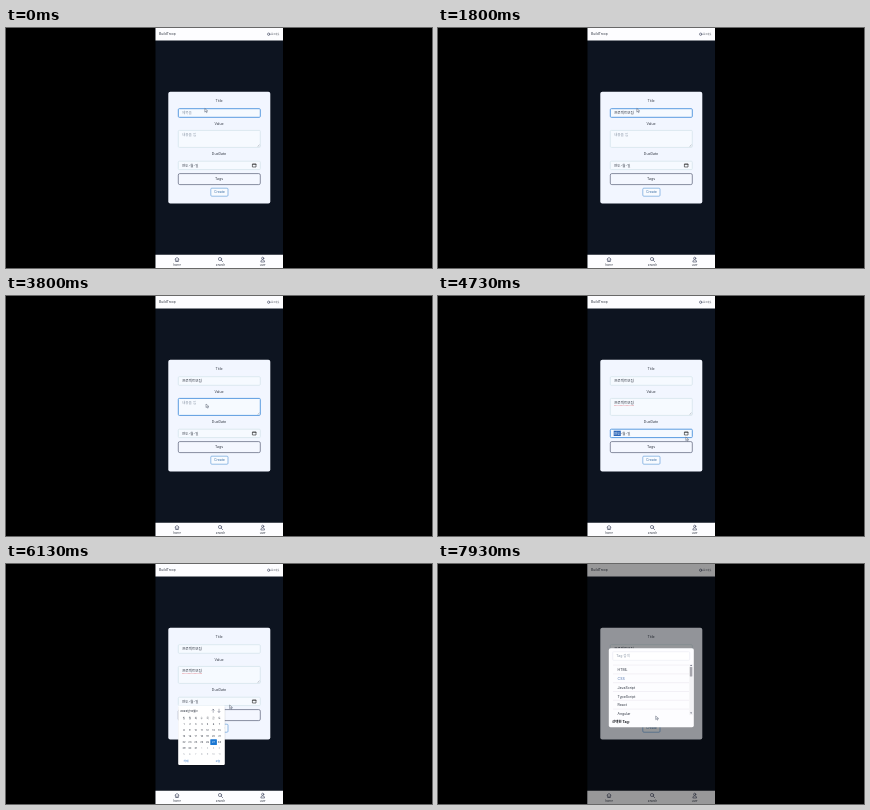
Write an HTML page that moves like this. It is 426x240 px and loops after 8 s.

```html
<!DOCTYPE html>
<html lang="ko">
<head>
<meta charset="utf-8">
<title>Create form</title>
<style>
html, body { margin: 0; width: 100%; height: 100%; overflow: hidden; background: #000; }
svg { display: block; width: 100vw; height: 100vh; }
text { font: 3.5px Inter, "Noto Sans CJK KR", "Noto Sans CJK", sans-serif; fill: #343a46; }
.mid { text-anchor: middle; }
.hint { fill: #8d99a8; }
.line { fill: none; stroke: #39405a; stroke-width: .6; stroke-linecap: round; stroke-linejoin: round; }
.field { fill: #f6faff; stroke: #d3e3ea; stroke-width: .7; }
.field.focus { stroke: #5b9ce0; stroke-width: 1; }
.mark { fill: #2c66b8; }
.inverse { fill: #fff; }
</style>
</head>
<body>
<svg viewBox="0 0 426 240">
  <rect width="426" height="240"/>
  <rect x="149.5" width="127.5" height="240" fill="#0d1420"/>
  <g id="bars">
    <path d="M149.5 0h127.5v12.5h-127.5zM149.5 226.8h127.5v13.2h-127.5z" fill="#fdfdff"/>
    <text x="153" y="7.3" style="font-size:3.3px">BuildTroop</text>
    <circle class="line" cx="262.7" cy="6.2" r="1.2"/>
    <text x="265" y="7.3" style="font-size:2.3px">로그아웃</text>
    <path class="line" d="M169 231.2l2-1.8 2 1.8M169.6 231v2.5h2.8V231M171 233.4v-1.3"/>
    <g class="line"><circle cx="214" cy="231" r="1.6"/><path d="M215.2 232.2l1.5 1.5"/></g>
    <g class="line"><circle cx="256.7" cy="230.3" r="1.1"/><path d="M254.8 233.6q0-1.8 1.9-1.8t1.9 1.8z"/></g>
    <g class="mid" style="--s:3px">
      <text x="171" y="238">home</text>
      <text x="214.5" y="238">search</text>
      <text x="256.7" y="238">user</text>
    </g>
  </g>

  <g id="form">
    <rect x="162.3" y="63.8" width="102" height="111.7" rx="2" fill="#f2f6ff"/>
    <g class="mid">
      <text x="213" y="74.2">Title</text>
      <text x="213" y="96.8">Value</text>
      <text x="213" y="127.2">DueDate</text>
    </g>
    <rect id="titleBox" class="field" x="172.3" y="80.7" width="82" height="8.6" rx="1"/>
    <rect id="titleMark" class="mark" x="176" y="82.2" width="20" height="5.4"/>
    <text id="titleText" x="176" y="86.4"></text>
    <rect id="valueBox" class="field" x="172.3" y="102.4" width="82" height="17" rx="1"/>
    <path d="M251.5 118.5l2-2M252.7 118.7l1-1" stroke="#8a909c" stroke-width=".4"/>
    <text id="valueText" x="176" y="108.4"></text>
    <path id="spell" d="M176 109.5h20" stroke="#e58790" stroke-width=".6" stroke-dasharray=".8 .4"/>
    <rect id="dateBox" class="field" x="172.3" y="133.2" width="82" height="8.4" rx="1"/>
    <rect id="yearMark" class="mark" x="175.7" y="134.7" width="7.1" height="5.3"/>
    <text id="yearText" x="176" y="138.8">연도</text>
    <text id="monthText" x="182.7" y="138.8">-월-일</text>
    <path d="M246.8 136h3.2v3h-3.2zM246.8 136.3h3.2" class="line" style="stroke:#222"/>
    <rect x="172.3" y="145.6" width="82" height="11" rx="1.5" fill="#f4f7ff" stroke="#6d7388" stroke-width=".8"/>
    <text class="mid" x="213" y="152.2">Tags</text>
    <rect x="204.8" y="160.2" width="17.2" height="8" rx="1" fill="#f8fbff" stroke="#6aa2dc" stroke-width=".7"/>
    <text class="mid" x="213.4" y="165.4" style="fill:#4072a8">Create</text>
  </g>

  <g id="calendar">
    <rect x="172.2" y="142" width="47" height="60" rx="1.5" fill="#000" opacity=".18"/>
    <rect x="172.2" y="141.4" width="46.6" height="59.6" rx="1.2" fill="#fff"/>
    <text x="174.3" y="148" style="font-size:2.7px;font-weight:600">2023년 10월 ▾</text>
    <path class="line" style="stroke-width:.4" d="M207.2 148.4v-3.2l-1 1m1-1l1 1M213 145.2v3.2l-1-1m1 1l1-1"/>
    <rect x="204.3" y="175.2" width="6.6" height="5.8" rx=".6" fill="#1976d2"/>
    <g id="days"></g>
    <text x="177.6" y="198.2" style="font-size:2.7px;fill:#2a70c4">삭제</text>
    <text x="209.4" y="198.2" style="font-size:2.7px;fill:#2a70c4">오늘</text>
  </g>

  <g id="tagDialog">
    <rect x="149.5" width="127.5" height="240" opacity=".4"/>
    <rect x="170.8" y="84.2" width="85" height="79" rx="1.8" fill="#fdfdff"/>
    <rect x="174.7" y="87.7" width="77" height="8.6" rx="1" fill="#fff" stroke="#e8eaf2" stroke-width=".6"/>
    <text class="hint" x="178.2" y="93.4">Tag 검색</text>
    <g id="tags"></g>
    <rect x="251.3" y="100.2" width="3.6" height="51" fill="#f2f2f5"/>
    <rect x="251.8" y="103" width="2.5" height="9.5" rx=".6" fill="#a6a6ad"/>
    <path d="M252.1 102l1-1.2 1 1.2zM252.1 148.5h2l-1 1.2z" fill="#53576a"/>
    <text x="174" y="158.7" style="font-weight:700;fill:#15171d">선택한 Tag:</text>
  </g>

  <path id="pointer" d="M0 0v4.2l1.1-1 .8 1.7.8-.4-.8-1.6h1.5z" fill="#fff" stroke="#38435a" stroke-width=".5"/>
</svg>
<script>
const LOOP = 8000;
const PHRASE = "프로젝트모집";
const $ = id => document.getElementById(id);

// Time, x, y of the pointer tip; it eases from stop to stop.
const stops = [
  [0, 198.8, 80.5], [2200, 198.8, 80.5], [2650, 156.6, 83.5], [3250, 156.6, 83.5],
  [3600, 200, 108], [4000, 200, 108], [4450, 247.8, 141], [5750, 247.8, 141],
  [6130, 223.6, 141], [6550, 207.5, 178], [6750, 207.5, 178],
  [7100, 214, 150.5], [7400, 214, 150.5], [7750, 217.7, 152]
];
const typedAt = [400, 600, 820, 1000, 1400, 1650];

function addText(parent, value, x, y, style = "", cls = "") {
  const node = document.createElementNS("http://www.w3.org/2000/svg", "text");
  node.textContent = value;
  node.setAttribute("x", x);
  node.setAttribute("y", y);
  node.setAttribute("class", cls);
  node.style.cssText = style;
  parent.append(node);
}

const column = i => 178 + i * 5.9;
[..."일월화수목금토"].forEach((day, i) =>
  addText($("days"), day, column(i), 155.2, "font-size:2.5px", "mid"));
for (let i = 0; i < 42; i++) {
  const color = i === 26 ? "#fff" : i < 31 ? "#343a46" : "#a4a9b2";
  addText($("days"), i % 31 + 1, column(i % 7), 161.1 + Math.floor(i / 7) * 6,
    `font-size:2.5px;fill:${color}`, "mid");
}
["HTML", "CSS", "JavaScript", "TypeScript", "React", "Angular"].forEach((tag, i) => {
  const y = 107.2 + i * 8.8;
  addText($("tags"), tag, 179.6, y, i === 1 ? "fill:#4f72ad" : "");
  const rule = document.createElementNS("http://www.w3.org/2000/svg", "path");
  rule.setAttribute("d", `M175 ${y - 6.1}h76`);
  rule.setAttribute("stroke", "#e6e3ec");
  rule.setAttribute("stroke-width", ".5");
  $("tags").append(rule);
});
document.querySelectorAll("#bars .mid text").forEach(node => node.style.fontSize = "2.9px");

const show = (id, on) => $(id).style.display = on ? "" : "none";
const toggle = (id, name, on) => $(id).classList.toggle(name, on);

function setField(id, value, hint) {
  $(id).textContent = value || hint;
  toggle(id, "hint", !value);
  $(id).style.fontSize = "3.6px";
}

function pointerAt(t) {
  const next = stops.findIndex(stop => stop[0] > t);
  if (next < 0) return stops.at(-1).slice(1);
  const [t0, x0, y0] = stops[next - 1], [t1, x1, y1] = stops[next];
  const p = (t - t0) / (t1 - t0), e = p * p * (3 - 2 * p);
  return [x0 + (x1 - x0) * e, y0 + (y1 - y0) * e];
}

function draw(t) {
  const within = (from, to) => t >= from && t < to;
  const selecting = within(2300, 3650);
  const pasted = t >= 3900;
  const picked = t >= 6700;
  const yearActive = within(4550, 5650);

  setField("titleText", PHRASE.slice(0, typedAt.filter(at => t >= at).length), "제목을");
  setField("valueText", pasted ? PHRASE : "", "내용을 입");
  toggle("titleText", "inverse", selecting);
  show("titleMark", selecting);
  const swept = Math.min(1, Math.max(0, (t - 2300) / 300)) * 20;
  $("titleMark").setAttribute("x", 196 - swept);
  $("titleMark").setAttribute("width", swept);
  show("spell", pasted);

  $("yearText").textContent = picked ? "2023" : "연도";
  $("monthText").textContent = picked ? "-10-27" : "-월-일";
  $("monthText").setAttribute("x", picked ? 184.5 : 182.7);
  toggle("yearText", "inverse", yearActive);
  show("yearMark", yearActive);

  toggle("titleBox", "focus", t < 3650);
  toggle("valueBox", "focus", within(3650, 4550));
  toggle("dateBox", "focus", yearActive);
  show("calendar", within(5650, 6700));
  show("tagDialog", t >= 7200);
  $("pointer").setAttribute("transform", `translate(${pointerAt(t)}) scale(.85)`);
}

const start = performance.now();
function tick() {
  draw((performance.now() - start) % LOOP);
  requestAnimationFrame(tick);
}
tick();
</script>
</body>
</html>
```
